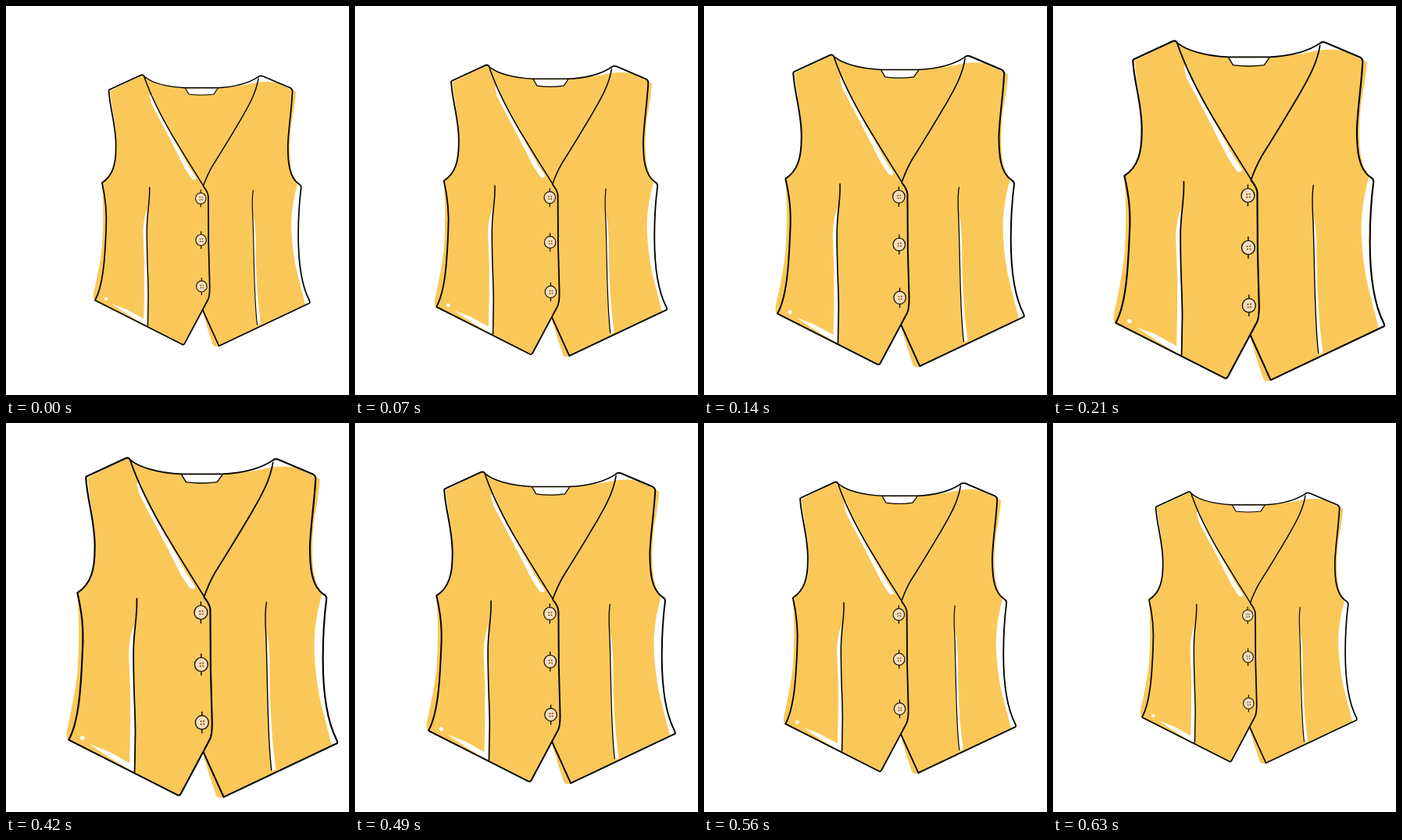
Write an HTML page that moves like this. It is 439 px wide and 498 px high and loops after 860 ms.

```html
<!DOCTYPE html>
<html lang="en">
<head>
<meta charset="utf-8">
<title>Waistcoat</title>
<style>
  html, body { margin: 0; width: 100%; height: 100%; overflow: hidden; background: #fff; }
  svg { display: block; width: 100vw; height: 100vh; }
  .cloth { fill: #fac858; }
  .shine { fill: #fff; }
  .line { fill: none; stroke: #000; stroke-width: 1.9; stroke-linecap: round; stroke-linejoin: round; }
  .edge { stroke-width: 2.3; }
  .thin { stroke-width: 1.5; }
  .button { fill: #fadfbd; stroke: #1a1208; stroke-width: 1.5; }
  .hole { fill: #7a5526; }
</style>
</head>
<body>
<svg viewBox="0 0 439 498">
  <g id="vest">
    <path class="cloth" d="M93 55 L148 28 L154 32 C164 41 188 48 223 50 L285 50 Q322 47 345 41 Q366 38 381 41
      L414 57 Q412 82 406 112 C402 150 402 184 411 205 L417 214 C409 245 406 264 406 290 C407 325 412 355 418 377
      L430 424 L281 496 Q275 499 271 495 L262 468 L252 434 L220 494 L68 419 Q62 416 65 402
      C71 376 76 350 79 325 Q83 270 79 215 C98 203 104 181 104 153 C104 120 96 90 93 55 Z"/>
    <path class="shine" d="M224 51 L229 61 Q250 64 272 61 L279 51 Z"/>

    <path class="shine" d="M161 64 Q162 60 166 62 L172 79 L200 134 L230 188 L242 206 Q238 212 233 206 L222 189 L194 134 L165 79 Z"/>
    <path class="shine" d="M157 258 Q150 278 150 300 Q153 350 152 400 L151 449 L122 433 L96 423 Q126 444 154 460 L158 460 L158 400 L156 310 Z"/>
    <circle class="shine" cx="86" cy="414.5" r="3"/>
    <path class="shine" d="M340 268 Q344 280 344.5 315 Q344.5 370 348.5 418 L353 458 L347 460 Q341 400 341 340 Z"/>

    <path class="line edge" d="M153 33 Q151 26 146 28 L92 53 Q90 54 91 58 C93 88 104 118 103 153 C103 181 98 202 79 214
      C85 240 88 262 86 295 C84 345 81 392 67 417 L217 493 Q220 495 222 491 L262 416 Q265 410 265 394 L263 320 L262.5 237 Q262 230 254 220"/>
    <path class="line edge" d="M253 434 L281 496 L437 422 Q439 421 437 417 C422 388 418 345 418 305 Q418 260 423 222
      Q423 218 419 216 C402 205 400 178 400 150 C401 120 406 92 408 56 Q408 52 404 50 L357 30 Q352 28 349 31"/>
    <path class="line" d="M153 34 C165 68 181 99 201 133 Q228 178 254 219"/>
    <path class="line" d="M349 34 C345 60 331 83 319 104 Q293 148 269 186 Q261 200 254 219"/>
    <path class="line" d="M153 31 C164 40 188 48 223 50 L278 50 C305 49 331 43 349 31"/>
    <path class="line thin" d="M223 51 L229 61 Q250 64 272 61 L279 51"/>
    <path class="line" d="M161 222 C162 246 157 264 156.5 292 C156 340 159 380 159 408 L158 461"/>
    <path class="line thin" d="M340 227 Q337.5 242 339.5 275 C342 340 341 410 347 459"/>
    <g id="buttons"></g>
  </g>
</svg>
<script>
const LOOP = 860;
const PIVOT = { x: 248.5, y: 261.5 };
// [start in ms, scale]
const STEPS = [
  [0, 0.741], [70, 0.795], [140, 0.851], [210, 0.927], [280, 1],
  [420, 0.927], [490, 0.851], [560, 0.795], [630, 0.741]
];

const vest = document.getElementById('vest');

function button(x, y) {
  const holes = [[-1.4, -1.6], [2.4, -1.8], [-1.2, 2.4], [2.6, 2.2]]
    .map(([dx, dy]) => `<circle class="hole" cx="${x + dx}" cy="${y + dy}" r="1.2"/>`)
    .join('');
  return `<path class="line thin" d="M${x} ${y - 14.5}V${y + 14.5}"/>
    <ellipse class="button" cx="${x}" cy="${y}" rx="9.1" ry="9.6"/>${holes}`;
}

document.getElementById('buttons').innerHTML =
  button(249.5, 241) + button(250, 313) + button(251, 393);

function draw(now) {
  const t = now % LOOP;
  const scale = STEPS.filter(([start]) => start <= t).pop()[1];
  const x = PIVOT.x * (1 - scale);
  const y = PIVOT.y * (1 - scale);
  vest.setAttribute('transform', `translate(${x} ${y}) scale(${scale})`);
}

const begin = performance.now();
function tick() {
  draw(performance.now() - begin);
  requestAnimationFrame(tick);
}
tick();
</script>
</body>
</html>
```
